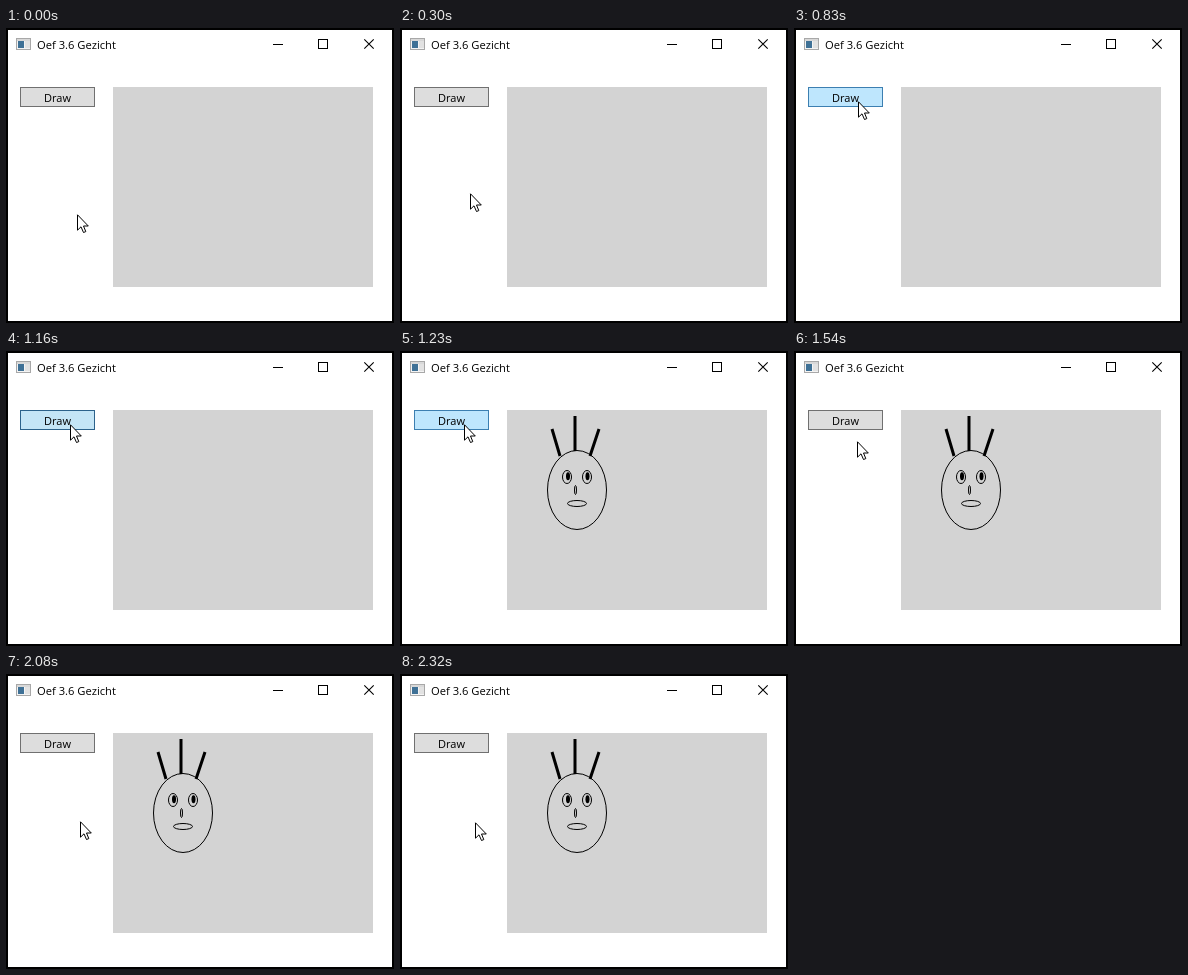
Animation of 388 by 295 pixels, one loop 3330 ms. Source, as an HTML page:

```html
<!DOCTYPE html>
<html lang="nl">
<head>
<meta charset="utf-8">
<title>Oef 3.6 Gezicht</title>
<style>
  html, body { margin: 0; width: 100%; height: 100%; overflow: hidden; background: #fff; }
  svg { display: block; width: 388px; height: 295px; }
  text { font-family: "Open Sans", "Noto Sans", sans-serif; fill: #000; }
  .crisp { shape-rendering: crispEdges; }
  .line { fill: none; stroke: #000; }

  .button, .face, .cursor { animation: 3330ms step-end infinite; }
  .button { fill: #ddd; stroke: #707070; animation-name: press; }
  .face { visibility: hidden; animation-name: appear; }
  .cursor { animation-name: move; }

  /* normal, hover, pressed, hover, normal */
  @keyframes press {
    0%, 43.843% { fill: #ddd; stroke: #707070; }
    20.72%, 36.936% { fill: #bee6fd; stroke: #3c7fb1; }
    34.834% { fill: #c4e5f6; stroke: #2c628b; }
    100% { fill: #ddd; stroke: #707070; }
  }
  @keyframes appear {
    0% { visibility: hidden; }
    36.936%, 100% { visibility: visible; }
  }
  /* the pointer moves in sampled jumps */
  @keyframes move {
    0% { transform: translate(71px, 186px); }
    6.606% { transform: translate(71px, 181px); }
    9.009% { transform: translate(70px, 165px); }
    11.411% { transform: translate(69px, 142px); }
    13.513% { transform: translate(67px, 118px); }
    15.915% { transform: translate(66px, 97px); }
    18.018% { transform: translate(65px, 82px); }
    20.72% { transform: translate(65px, 77px); }
    22.522% { transform: translate(64px, 75px); }
    24.924% { transform: translate(64px, 73px); }
    43.843% { transform: translate(63px, 80px); }
    46.246% { transform: translate(63px, 90px); }
    48.648% { transform: translate(65px, 101px); }
    51.051% { transform: translate(67px, 112px); }
    53.453% { transform: translate(70px, 123px); }
    55.855% { transform: translate(72px, 134px); }
    58.258% { transform: translate(73px, 143px); }
    60.66% { transform: translate(74px, 145px); }
    62.462% { transform: translate(74px, 147px); }
    67.267% { transform: translate(75px, 147px); }
    69.669%, 100% { transform: translate(75px, 148px); }
  }
</style>
</head>
<body>
<svg viewBox="0 0 388 295">
  <rect class="crisp" x="1" y="1" width="386" height="293" fill="#fff" stroke="#000" stroke-width="2"/>

  <!-- title bar -->
  <g class="crisp">
    <rect x="10.5" y="10.5" width="14" height="11" fill="#f4f4f4" stroke="#a8a8a8"/>
    <rect x="11" y="11" width="13" height="2" fill="#d8d8d8"/>
    <rect x="12" y="13" width="6" height="7" fill="#3f7196"/>
    <rect x="19" y="13" width="5" height="7" fill="#e2e2e2"/>
  </g>
  <text x="31" y="21" font-size="11.2">Oef 3.6 Gezicht</text>
  <path class="line crisp" d="M267 16.5h10M312.5 11.5h9v9h-9z"/>
  <path class="line" d="M358.3 11.3l9.4 9.4M367.7 11.3l-9.4 9.4" stroke-width="1.1"/>

  <rect class="button crisp" x="14.5" y="59.5" width="74" height="19"/>
  <text x="51.5" y="74" font-size="11" text-anchor="middle">Draw</text>

  <rect class="crisp" x="107" y="59" width="260" height="200" fill="#d3d3d3"/>
  <g class="face">
    <g class="line">
      <ellipse cx="177" cy="139" rx="29.5" ry="39.5"/>
      <ellipse cx="167" cy="126" rx="4.5" ry="6.5"/>
      <ellipse cx="187" cy="126" rx="4.5" ry="6.5"/>
      <ellipse cx="175.5" cy="139" rx="1" ry="4.5"/>
      <ellipse cx="177" cy="152.5" rx="9.5" ry="3"/>
      <path d="M152 78l8 27M175 65v35M199 78l-9 27" stroke-width="3"/>
    </g>
    <ellipse cx="168" cy="125.3" rx="2" ry="4"/>
    <ellipse cx="187.5" cy="125.3" rx="2" ry="4"/>
  </g>

  <path class="cursor" d="M.5 .8V16.2L4 12.8 6.5 18.5 8.8 17.6 6.5 12H11.3Z" fill="#fff" stroke="#000"/>
</svg>
</body>
</html>
```
